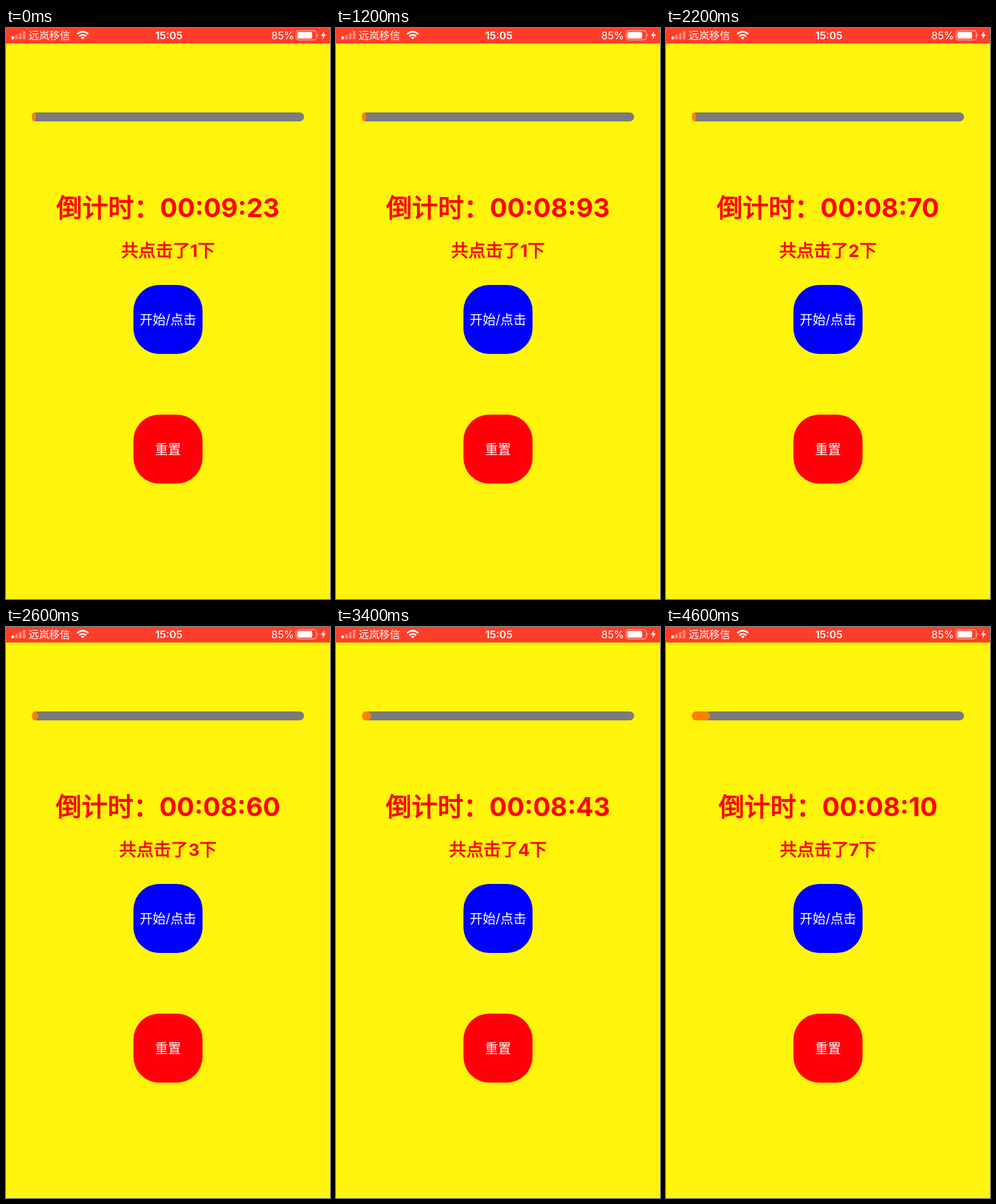
These frames come from a looping animation (544x960 px, 4.8 s). An HTML page:

```html
<!DOCTYPE html>
<html lang="zh-CN">
<head>
<meta charset="utf-8">
<title>点击倒计时</title>
<style>
  html, body { margin: 0; width: 100%; height: 100%; overflow: hidden; background: #fff40c; }
  svg { display: block; width: 100vw; height: 100vh; }
  text { font-family: Inter, "Noto Sans CJK SC", "Noto Sans CJK", sans-serif; fill: #fff; white-space: pre; }
  .cjk { font-family: "Noto Sans CJK SC", "Noto Sans CJK", sans-serif; font-weight: 400; }
  .label { fill: #f00; text-anchor: middle; font-weight: 700; }
  .label .cjk { stroke: #f00; stroke-width: .03em; }
  .button { font-size: 21.77px; text-anchor: middle; }
  .status { font-size: 17.4px; }
</style>
</head>
<body>
<svg viewBox="0 0 544 960" preserveAspectRatio="none">
  <rect width="544" height="960" fill="#fff40c"/>

  <rect width="544" height="26" fill="#ff3d29"/>
  <g fill="#fff">
    <rect x="9" y="14" width="4.4" height="5" rx="1"/>
    <g opacity=".4">
      <rect x="15.4" y="11.5" width="4.4" height="7.5" rx="1"/>
      <rect x="21.8" y="8.5" width="4.4" height="10.5" rx="1"/>
      <rect x="28.2" y="5" width="4.4" height="14" rx="1"/>
    </g>
  </g>
  <text class="status cjk" x="38" y="19">远岚移信</text>
  <g fill="none" stroke="#fff" stroke-width="2.8">
    <path d="M119.5 10.3Q128.8 2 138.1 10.3M123 14Q128.8 8.8 134.6 14"/>
    <path d="M125.6 16Q128.8 13.3 132 16L128.8 19.2Z" fill="#fff" stroke="none"/>
  </g>
  <text class="status" x="273.5" y="18.7" text-anchor="middle" font-weight="600">15:05</text>
  <text class="status" x="445.5" y="18.7">85%</text>
  <rect x="487" y="4.5" width="34" height="15.5" rx="4" fill="none" stroke="#fff" stroke-opacity=".55" stroke-width="1.4"/>
  <rect x="489.3" y="6.8" width="24.8" height="11" rx="2" fill="#fff"/>
  <path d="M522.7 9.5Q525 12.2 522.7 15Z" fill="#fff" fill-opacity=".6"/>
  <path d="M534.4 5L528.8 13.2H532.4L531 19.3L537 10.8H533.2Z" fill="#fff"/>

  <rect x="43.5" y="142" width="457" height="15" rx="7.5" fill="#7b7b7b"/>
  <rect id="progress" x="43.5" y="142" height="15" ry="7.5" fill="#ff8000"/>

  <text class="label" x="272" y="318" font-size="43.5"><tspan class="cjk">倒计时：</tspan><tspan id="countdown"></tspan></text>
  <text class="label" x="272" y="384.5" font-size="29"><tspan class="cjk">共点击了</tspan><tspan id="clicks"></tspan><tspan class="cjk">下</tspan></text>

  <rect x="214" y="432" width="116" height="116" rx="43.5" fill="#00f"/>
  <text class="button" x="272" y="498.3"><tspan class="cjk">开始</tspan>/<tspan class="cjk">点击</tspan></text>
  <rect x="214" y="650" width="116" height="116" rx="43.5" fill="#ff0008"/>
  <text class="button cjk" x="272" y="716.3">重置</text>
</svg>
<script>
  const LOOP = 4800, STEP = 200;
  const clickTimes = [0, 1600, 2400, 3200, 3800, 4200, 4600];
  // [ms, hundredths of a second left]
  const countdownKeys = [[0, 923], [600, 906], [1200, 893], [1800, 879], [2600, 860], [3400, 843], [4600, 810]];
  const byId = id => document.getElementById(id);
  const pad = n => String(n).padStart(2, "0");

  function remaining(t) {
    const i = countdownKeys.findIndex(([end], k) => k > 0 && t <= end);
    const [t0, v0] = countdownKeys[i - 1], [t1, v1] = countdownKeys[i];
    return Math.round(v0 + (v1 - v0) * (t - t0) / (t1 - t0));
  }

  function render(time) {
    const t = Math.floor(time % LOOP / STEP) * STEP;
    const left = remaining(t);
    const count = clickTimes.filter(at => at <= t).length;
    const width = Math.max(7, 5 * (count - 1) + .3);
    byId("countdown").textContent = `00:${pad(Math.floor(left / 100))}:${pad(left % 100)}`;
    byId("clicks").textContent = count;
    byId("progress").setAttribute("width", width);
    byId("progress").setAttribute("rx", Math.min(7.5, width / 2));
  }

  const start = performance.now();
  function tick() {
    render(performance.now() - start);
    requestAnimationFrame(tick);
  }
  tick();
</script>
</body>
</html>
```
